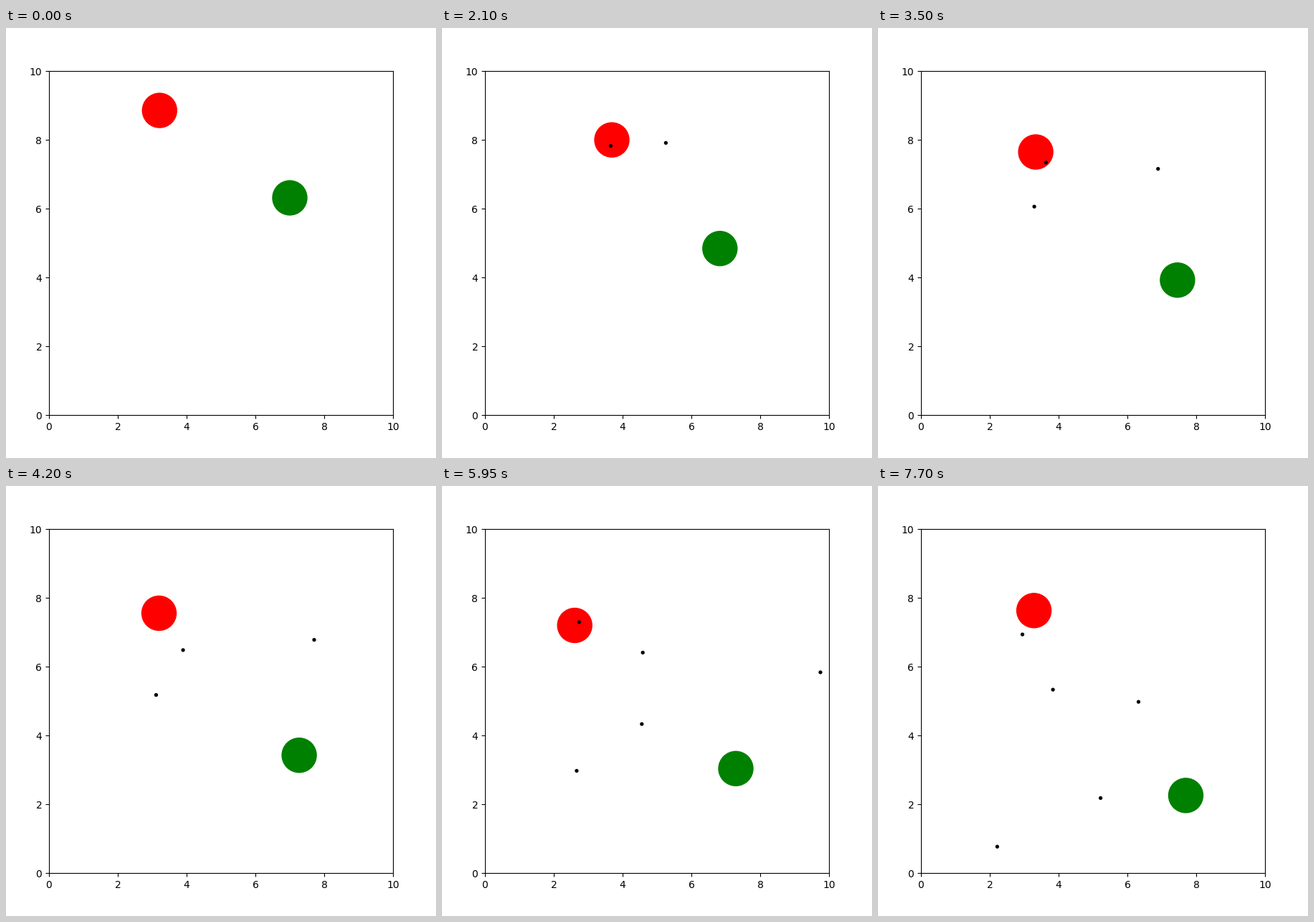
A matplotlib script for the animation above (8 s loop, 600 px wide and 600 px high).

```python
import numpy as np
import matplotlib.pyplot as plt
from matplotlib.animation import FuncAnimation
from matplotlib.patches import Circle

TICK = 50             # ms per drawn frame
HOLD = 7              # drawn frames per movement step
FRAMES = 160
RELOAD = 4            # steps between shots
SHOT_SPEED = 0.45     # axis units per step
SHOT_ANGLES = [-24.8, -101.5, -72.9, -39.5, -60.7, -98.0]

# Turning points (step, x, y) in stage pixels; motion between them is linear
RED_TURNS = [(0, 214.3, 115), (4, 239.6, 143.4), (5, 241.5, 150.7),
             (8, 228, 167), (10, 220.1, 173), (12, 213.5, 177.5),
             (13, 209.4, 176.5), (17, 185.2, 194.5), (19, 198, 191.7),
             (22, 217.6, 173.8)]
GREEN_TURNS = [(0, 396, 237), (2, 396, 261), (3, 391.6, 273), (5, 376.3, 297),
               (9, 422.3, 339.8), (12, 409.1, 375.7), (13, 407, 387.8),
               (15, 403, 387), (17, 410, 394.3), (19, 417.2, 411.5),
               (21, 422.1, 425), (22, 429.5, 431.8)]


def position(turns, step):
    """Point on a path at the given step, in axis units."""
    t, x, y = np.transpose(turns)
    return np.array([np.interp(step, t, x) - 60, 540 - np.interp(step, t, y)]) / 48


def shot_position(n, step):
    """Shot n leaves from where the red disc was one step before."""
    fired = n * RELOAD
    angle = np.radians(SHOT_ANGLES[n])
    heading = np.array([np.cos(angle), np.sin(angle)])
    return position(RED_TURNS, fired) + SHOT_SPEED * (step - fired - 1) * heading


fig = plt.figure(figsize=(6, 6), dpi=100)
ax = fig.add_axes([0.1, 0.1, 0.8, 0.8], xlim=(0, 10), ylim=(0, 10))


def disc(radius, color):
    return ax.add_patch(Circle((0, 0), radius, color=color))


red = disc(0.5, "red")
green = disc(0.5, "green")
shots = [disc(0.04, "black") for _ in SHOT_ANGLES]


def update(frame):
    step = frame // HOLD
    red.center = position(RED_TURNS, step)
    green.center = position(GREEN_TURNS, step)
    for n, shot in enumerate(shots):
        shot.center = shot_position(n, step)
        inside = all(0 < c < 10 for c in shot.center)
        shot.set_visible(step > n * RELOAD and inside)
    return [red, green, *shots]


anim = FuncAnimation(fig, update, frames=FRAMES, interval=TICK,
                     repeat=True, repeat_delay=0)
plt.show()
```
